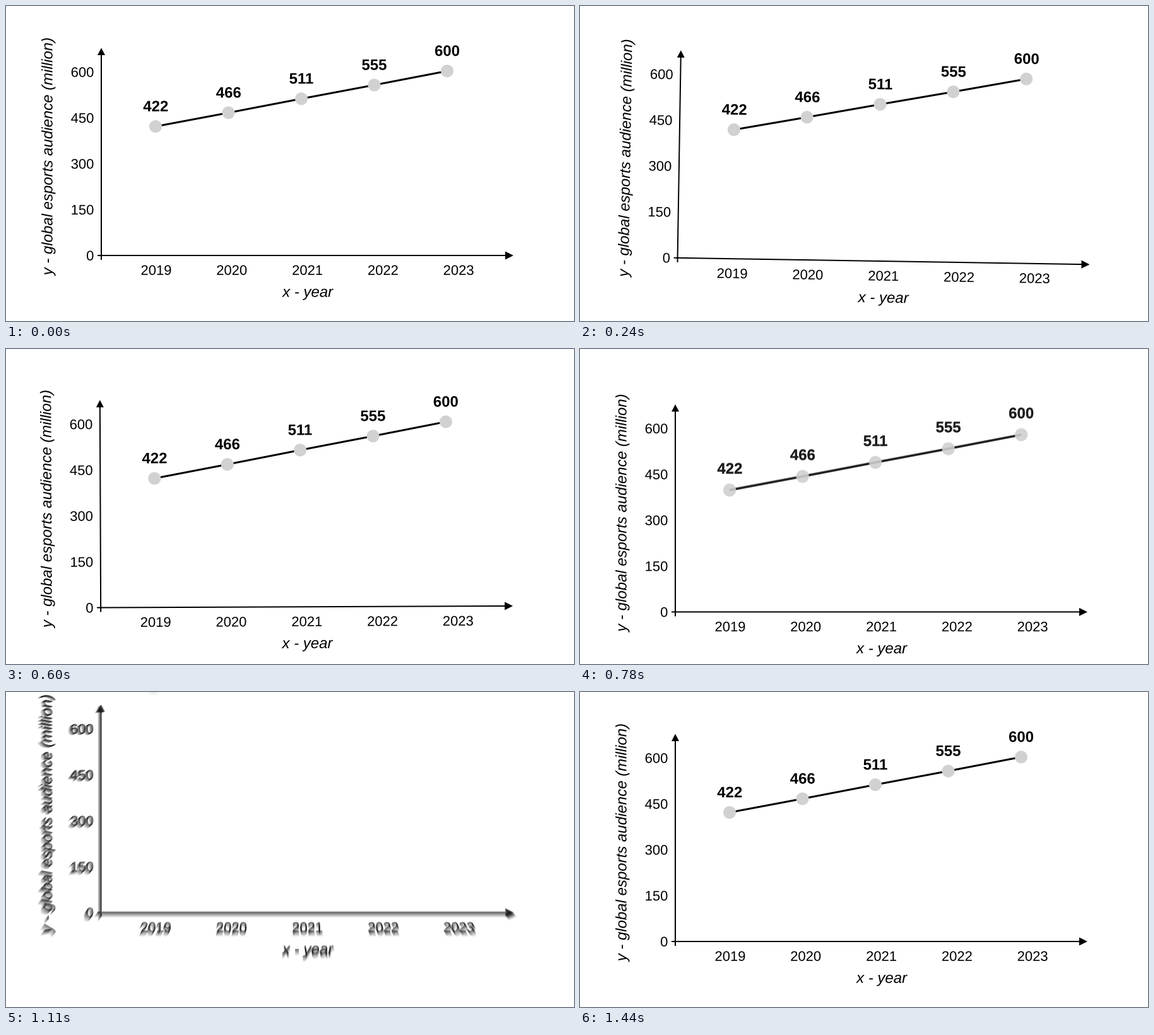
These frames come from a looping animation (900x500 px, 3600 ms). A matplotlib script:

```python
import numpy as np
import matplotlib.pyplot as plt
from matplotlib.animation import FuncAnimation
from matplotlib.patches import PathPatch
from matplotlib.path import Path
from matplotlib.textpath import TextPath
from matplotlib.transforms import Affine2D

W, H, DPI = 900, 500, 100
STEP, FRAMES = 30, 120
SHAKE_END, DROP_START, LEAP, PEAK, LAND = 780, 660, 960, 1170, 1440
COPIES, SHUTTER, MIN_BLUR = 6, 7, 1.2
ALPHAS = 0.5 * (1 - np.arange(COPIES) / COPIES)
PIVOT, BLUR_CENTER = (450, 250), (450, 150)
CORNERS = np.array([(57, 52), (803, 52), (57, 466), (803, 466)])


def progress(t, start, end):
    return np.clip((t - start) / (end - start), 0, 1)


def smooth(u):
    return u * u * (3 - 2 * u)


def shake(t):
    """Swaying that swells and dies away, within -1..1."""
    return np.sin(np.pi * progress(t, 0, SHAKE_END)) * np.sin(2 * np.pi * t / 620)


def rise(t, extra, height):
    """Vertical offset: a bob, a deepening crouch, a leap and a landing."""
    if t < LEAP:
        bob = 9 * t / 120 * np.exp(1 - t / 120)
        return (bob + 32 * progress(t, 0, LEAP) ** 2
                + extra * progress(t, DROP_START, LEAP) ** 2)
    if t < PEAK:
        return 32 + extra - (32 + extra + height) * smooth(progress(t, LEAP, PEAK))
    return -height * (1 - smooth(progress(t, PEAK, LAND)))


def zoom_blur(t):
    return 0.016 * max(0, 1 - abs(t - 1110) / 120)


def text(string, x, y, size, anchor=0.5, angle=0, **font):
    """Glyph outlines with their ink anchored at x and the baseline on y."""
    path = TextPath((0, 0), string, size=size, prop={"family": "Liberation Sans", **font})
    box = path.get_extents()
    place = Affine2D().translate(-box.x0 - anchor * box.width, 0).scale(1, -1)
    return place.rotate_deg(angle).translate(x, y).transform_path(path)


def polygon(*points):
    return Path([*points, points[0]], closed=True)


def bar(x0, y0, x1, y1):
    return polygon((x0, y0), (x1, y0), (x1, y1), (x0, y1))


def axes_path():
    parts = [
        bar(145, 395, 792, 397), bar(150, 77, 152, 403),
        polygon((791, 389.5), (804, 396), (791, 402.5)),
        polygon((145, 78), (151, 66.5), (157, 78)),
        text("x - year", 478, 461.7, 24, style="italic"),
        text("y - global esports audience (million)", 73.5, 240, 24, angle=-90,
             style="italic"),
    ]
    parts += [text(str(v), 138.5, 403.8 - v * 0.4855, 22, anchor=1)
              for v in range(0, 601, 150)]
    parts += [text(str(2019 + i), 238 + 119.8 * i, 426.8, 22) for i in range(5)]
    return Path.make_compound_path(*parts)


audience = [422, 466, 511, 555, 600]
points = [(237 + 115.5 * i, 191.2 - 0.4944 * (v - audience[0]))
          for i, v in enumerate(audience)]
labels_path = Path.make_compound_path(*[
    text(str(v), x, y - 24, 24, weight="bold") for v, (x, y) in zip(audience, points)])
dots_path = Path.make_compound_path(*[Path.circle(p, 10) for p in points])

fig = plt.figure(figsize=(W / DPI, H / DPI), dpi=DPI, facecolor="white")
ax = fig.add_axes([0, 0, 1, 1])
ax.set(xlim=(0, W), ylim=(H, 0))
ax.axis("off")


class Layer:
    """Shapes that move together, with fading copies for blur."""

    def __init__(self, extra, height, *shapes):
        self.extra, self.height = extra, height
        self.moves = [Affine2D() for _ in range(COPIES)]
        self.copies = []
        for move in self.moves:
            patches = [PathPatch(path, transform=move + ax.transData, snap=False, **style)
                       for path, style in shapes]
            for patch in patches:
                ax.add_patch(patch)
            self.copies.append(patches)

    def pose(self, t, u):
        """Sample u in 0..1 trails back in time and outward from the centre."""
        s = max(0, t - SHUTTER * u)
        sway = shake(s)
        cx, cy = BLUR_CENTER
        return (Affine2D().rotate_around(*PIVOT, 0.03 * sway)
                .translate(11 * sway, rise(s, self.extra, self.height))
                .translate(-cx, -cy).scale(1 + zoom_blur(t) * u).translate(cx, cy))

    def update(self, t):
        poses = [self.pose(t, u) for u in np.linspace(0, 1, COPIES)]
        trail = poses[-1].transform(CORNERS) - poses[0].transform(CORNERS)
        blurred = np.abs(trail).max() > MIN_BLUR
        for i, patches in enumerate(self.copies):
            self.moves[i].set(poses[i])
            for patch in patches:
                patch.set_visible(blurred or i == 0)
                patch.set_alpha(ALPHAS[i] if blurred else 1)


def fill(color, zorder):
    return dict(facecolor=color, edgecolor="none", linewidth=0, zorder=zorder)


stroke = dict(fill=False, edgecolor="black", linewidth=3 * 72 / DPI,
              joinstyle="round", zorder=2)
layers = [
    Layer(0, 66, (axes_path(), fill("black", 1))),
    Layer(75, 286, (Path(points), stroke), (dots_path, fill("#d1d1d1", 3))),
    Layer(61, 286, (labels_path, fill("black", 4))),
]


def draw(frame):
    for layer in layers:
        layer.update(frame * STEP)
    return []


animation = FuncAnimation(fig, draw, frames=FRAMES, interval=STEP, repeat=True,
                          repeat_delay=0, blit=False)
plt.show()
```
